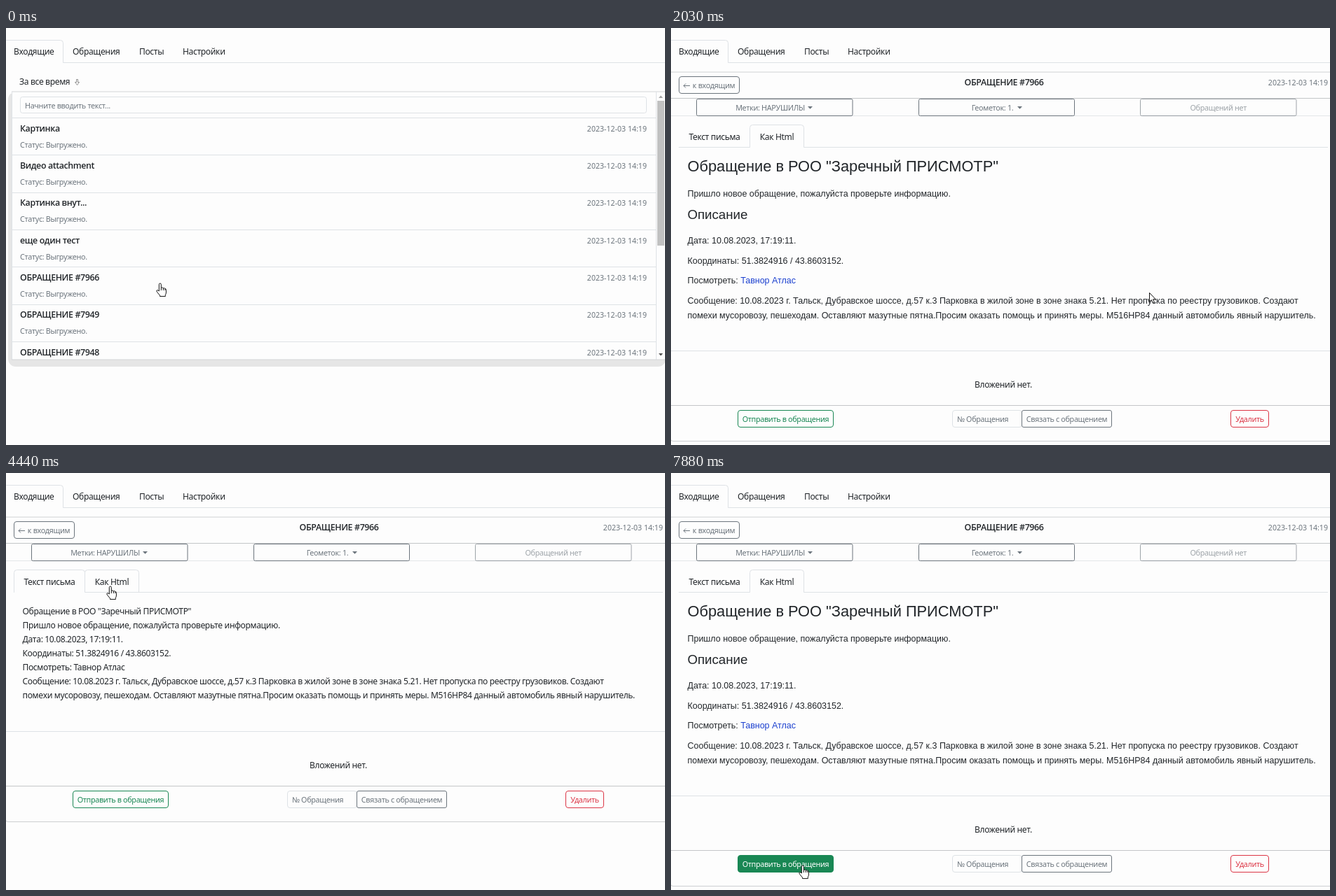
These frames come from a looping animation (940 by 596 pixels, 8000 ms). An HTML page:

```html
<!DOCTYPE html>
<html lang="ru">
<head>
<meta charset="utf-8">
<title>Входящие</title>
<style>
html, body { margin: 0; width: 100%; height: 100%; overflow: hidden; background: #fdfdfd; }
svg { display: block; width: 100%; height: 100%; }
text { font: 12.05px "Noto Sans", "Open Sans", sans-serif; letter-spacing: -.03em; fill: #212529; white-space: pre; }
text.small { font-size: 10.75px; fill: #6c757d; }
text.date { font-size: 10.6px; letter-spacing: 0; fill: #6c757d; }
text.bold { font-family: "Open Sans", "Noto Sans", sans-serif; font-size: 12.4px; font-weight: 600; }
text.mail { font: 12.48px "Liberation Sans", Arial, sans-serif; letter-spacing: 0; }
text.h1 { font-size: 21.8px; }
text.h2 { font-size: 18.66px; }
.link { fill: #1a3fcf; }
.btn rect { fill: #fdfdfd; stroke: currentColor; }
.btn text, .btn path { fill: currentColor; }
.btn.on rect { fill: currentColor; }
.btn.on text, .btn.on path { fill: #fff; }
.cursor path { fill: #fff; stroke: #111; stroke-linejoin: round; }
</style>
</head>
<body>
<script>
const LOOP = 8000, GREY = '#6c757d', LINE = '#dee2e6';

const text = (s, x, y, cls = '', anchor = 'start') =>
  `<text x="${x}" y="${y}" class="${cls}" text-anchor="${anchor}">${s}</text>`;
const rect = (x, y, w, h, fill, extra = '') =>
  `<rect x="${x}" y="${y}" width="${w}" height="${h}" fill="${fill}" ${extra}/>`;
const path = (d, fill = 'none', stroke = 'none', extra = '') =>
  `<path d="${d}" fill="${fill}" stroke="${stroke}" ${extra}/>`;
const hline = (y, color = LINE, x1 = 0, x2 = 940) => path(`M${x1} ${y}H${x2}`, 'none', color);
const group = (id, body, extra = '') => `<g id="${id}" ${extra}>${body}</g>`;
const button = (id, x, y, w, label, color, { rx = 3.5, mid = x + w / 2, caret, extra = '' } = {}) =>
  group(id, rect(x, y, w, 24, '', `rx="${rx}"`) + text(label, mid, y + 16.8, 'small', 'middle') +
    (caret ? path(`M${caret} ${y + 10.5}h7l-3.5 3.8z`) : ''), `class="btn" color="${color}" ${extra}`);
const tab = (id, x, y, w, h, active) =>
  group(id, path(`M${x} ${y + h}V${y + 4}q0-4 4-4H${x + w - 4}q4 0 4 4V${y + h}`, '#fdfdfd', LINE) +
    (active ? rect(x + .5, y + h - 1, w - 1, 2, '#fdfdfd') : ''));

// Page header
const header = hline(49.5) + tab('mainTab', -3.5, 17.5, 85, 32, true) +
  text('Входящие', 11, 38) + text('Обращения', 95, 38) + text('Посты', 190, 38) + text('Настройки', 252, 38);

// Inbox list
const titles = ['Картинка', 'Видео attachment', 'Картинка внут...', 'еще один тест',
  'ОБРАЩЕНИЕ #7966', 'ОБРАЩЕНИЕ #7949', 'ОБРАЩЕНИЕ #7948'];
const date = '2023-12-03 14:19';
const rows = titles.map((title, i) => {
  const y = 128.5 + 53.3 * i, edge = Math.floor(y) + .5;
  return hline(edge, LINE, 8, 927) + text(title, 20, y + 19.3, 'bold') +
    text(date, 914, y + 19.3, 'date', 'end') + text('Статус: Выгружено.', 20, y + 42.3, 'small');
}).join('');
const list = text('За все время', 19, 81) +
  path('M100.5 73.5h2v4h2l-3 4-3-4h2z', 'none', '#777', 'stroke-width=".8"') +
  rect(3, 91, 938, 393, '#e6e6e6', 'rx="11"') + rect(0, 88, 8, 6, '#fdfdfd') +
  rect(8, 91, 932, 383, '#fdfdfd') + hline(91, '#d3d5d7', 8) +
  rect(20.5, 98.5, 893, 23, '#fdfdfd', `rx="3" stroke="${LINE}"`) +
  text('Начните вводить текст...', 27, 114.5, 'small') +
  rect(8, 343, 919, 52, 'none', 'id="activeRow"') +
  `<g clip-path="url(#box)">${rows}</g>` +
  path('M8.5 91V474M927.5 91V474', 'none', LINE) + hline(474, '#d3d5d7', 8) +
  rect(929, 104, 10, 207, '#c1c1c1') +
  path('M931 100l3-3.5 3 3.5z', '#a3a3a3') + path('M931 465l3 3.5 3-3.5z', '#505050');

// Letter body, as HTML and as plain text
const heading = 'Обращение в РОО "Заречный ПРИСМОТР"';
const letter = [
  ['Пришло новое обращение, пожалуйста проверьте информацию.', 241],
  ['Дата: 10.08.2023, 17:19:11.', 308],
  ['Координаты: 51.3824916 / 43.8603152.', 337],
  ['Посмотреть: <tspan class="link">Тавнор Атлас</tspan>', 365],
  ['Сообщение: 10.08.2023 г. Тальск, Дубравское шоссе, д.57 к.3 Парковка в жилой зоне в зоне знака 5.21. Нет пропуска по реестру грузовиков. Создают', 394],
  ['помехи мусоровозу, пешеходам. Оставляют мазутные пятна.Просим оказать помощь и принять меры. М516НР84 данный автомобиль явный нарушитель.', 414.5]
];
const htmlView = text(heading, 23.5, 205, 'mail h1') + text('Описание', 23.5, 273, 'mail h2') +
  letter.map(([s, y]) => text(s, 23.5, y, 'mail')).join('');
const plainView = [heading, ...letter.map(([s]) => s.replace(/<.*?>/g, ''))]
  .map((s, i) => text(s, 23.5, 202 + 20 * i)).join('');

const footer = hline(461.5) + text('Вложений нет.', 474, 514, '', 'middle') + hline(539.5, '#c4c6c8') +
  button('send', 95.5, 546.5, 136, 'Отправить в обращения', '#198754') +
  rect(401.5, 546.5, 99, 24, '#fdfdfd', `rx="3.5" stroke="${LINE}"`) + text('№ Обращения', 408, 563.3, 'small') +
  button('bind', 500.5, 546.5, 128, 'Связать с обращением', GREY, { rx: 2.5 }) +
  button('remove', 798.5, 546.5, 54, 'Удалить', '#dc3545') +
  group('spinner', path('M484.5 557l3.5-4 3.5 4zM484.5 561.5l3.5 4 3.5-4z', '#444')) +
  group('focus', rect(399.5, 544.5, 103, 28, 'none', 'rx="5" stroke="#0d6efd" stroke-opacity=".27" stroke-width="3"') +
    rect(401.5, 546.5, 99, 24, 'none', 'rx="3.5" stroke="#86b7fe"')) +
  group('caret', path('M409 552V567', 'none', '#111')) +
  path('M-1 586.5q0 4 4 4H940', 'none', '#cdcfd1');

const detail = hline(63, '#d0d2d4') +
  button('back', 11.5, 69.5, 86, 'к входящим', GREY, { mid: 61 }) +
  path('M18 82.5h9M21 79.5l-3 3 3 3', 'none', GREY) +
  text('ОБРАЩЕНИЕ #7966', 475, 82, 'bold', 'middle') + text(date, 937, 82, 'date', 'end') +
  hline(100.5, '#c4c6c8') + hline(125.5, '#e4e6e8') +
  button('marks', 36.5, 101.5, 222.5, 'Метки: НАРУШИЛЫ', GREY, { rx: 2, mid: 141.5, caret: 195 }) +
  button('geo', 353.5, 101.5, 222, 'Геометок: 1.', GREY, { rx: 2, mid: 458.5, caret: 494 }) +
  button('none', 669.5, 101.5, 222.5, 'Обращений нет', GREY, { rx: 2, extra: 'opacity=".65"' }) +
  tab('plainHover', 11.5, 138.5, 101, 32) + tab('htmlHover', 112.5, 138.5, 77, 32) +
  hline(170.5, LINE, 11, 937) +
  tab('plainTab', 11.5, 138.5, 101, 32, true) + tab('htmlTab', 112.5, 138.5, 77, 32, true) +
  text('Текст письма', 62, 160, '', 'middle') + text('Как Html', 151, 160, '', 'middle') +
  group('htmlView', htmlView) + group('plainView', plainView) + group('footer', footer);

const cursors = group('arrow', path('M.5 .5V13.2L3.4 10.6 5.3 15.2 7.5 14.3 5.6 9.8H9.4Z')) +
  group('hand', path('M-1.7 11V1.5Q-1.7 0-.2 0T1.3 1.5V6.3Q4 5.4 4.3 6.9 6.5 6.1 6.9 7.6 8.4 7.4 8.4 9.5V13Q8.4 15 7.3 16.4V18.6H-.5V17.2L-4.4 12.5Q-5.8 10.5-4.7 9.8-3.4 9.2-1.7 11Z') +
    path('M1.3 6.3V10M4.3 6.9V10M6.9 7.6V10')) +
  group('beam', path('M-3-6Q0-6 0-5V5Q0 6-3 6M3-6Q0-6 0-5V5Q0 6 3 6'));

document.body.innerHTML =
  `<svg viewBox="0 0 940 596" preserveAspectRatio="none">
    <clipPath id="box">${rect(8, 91, 919, 383, '#000')}</clipPath>
    ${header}${group('list', list)}${group('detail', detail)}${group('cursor', cursors, 'class="cursor"')}
  </svg>`;

// Pointer positions: the screen is sampled about every 120 ms, each pose holds until the next
const poses = [];
const move = (start, kind, ...points) =>
  points.forEach(([x, y], i) => poses.push({ t: start + 120 * i, kind, x, y }));
move(0, 'hand', [220, 365]);
move(920, 'arrow', [219, 365]);
move(1670, 'arrow', [300, 365], [470, 370], [632, 376], [682, 378]);
move(2310, 'arrow', [668, 394], [600, 405], [480, 386], [360, 325], [268, 248], [217, 184], [198, 145], [199, 128]);
move(3270, 'hand', [192, 114]);
move(3420, 'arrow', [160, 177]);
move(3570, 'arrow', [128, 182], [98, 178], [75, 173]);
move(3930, 'hand', [60, 163], [54, 157], [73, 158]);
move(4320, 'hand', [120, 163], [149, 162]);
move(5260, 'arrow', [134, 223]);
move(5410, 'arrow', [123, 262], [138, 310], [185, 361], [260, 411], [345, 452], [420, 481], [459, 495]);
move(6280, 'arrow', [463, 525]);
move(6400, 'beam', [460, 565]);
move(6830, 'beam', [447, 565]);
move(6980, 'arrow', [373, 560], [325, 554], [298, 551]);
move(7370, 'arrow', [288, 549]);
move(7520, 'arrow', [262, 552]);
move(7640, 'hand', [220, 558], [196, 561], [188, 561]);

const $ = id => document.getElementById(id);
const show = (id, on) => { $(id).style.display = on ? '' : 'none'; };

function draw(t) {
  const within = (a, b) => t >= a && t < b;
  const plain = within(4170, 5000), focused = within(6550, 7760);
  show('list', t < 800);
  show('detail', t >= 800);
  $('activeRow').setAttribute('fill', within(370, 490) ? '#e9ecef' : t >= 490 ? '#f8f9fa' : 'none');

  show('htmlView', !plain);
  show('htmlTab', !plain);
  show('plainView', plain);
  show('plainTab', plain);
  show('plainHover', within(3930, 4170));
  show('htmlHover', within(4320, 5000));
  $('footer').setAttribute('transform', `translate(0 ${plain ? -92 : 0})`);

  $('marks').classList.toggle('on', within(3270, 3420));
  $('send').classList.toggle('on', t >= 7640);
  show('spinner', within(6400, 7760));
  show('focus', focused);
  show('caret', focused && !within(7100, 7520));

  const pose = poses.findLast(p => p.t <= t);
  for (const kind of ['arrow', 'hand', 'beam']) show(kind, kind === pose.kind);
  $('cursor').setAttribute('transform', `translate(${pose.x} ${pose.y})`);
}

const start = performance.now();
function tick() {
  draw((performance.now() - start) % LOOP);
  requestAnimationFrame(tick);
}
tick();
</script>
</body>
</html>
```
